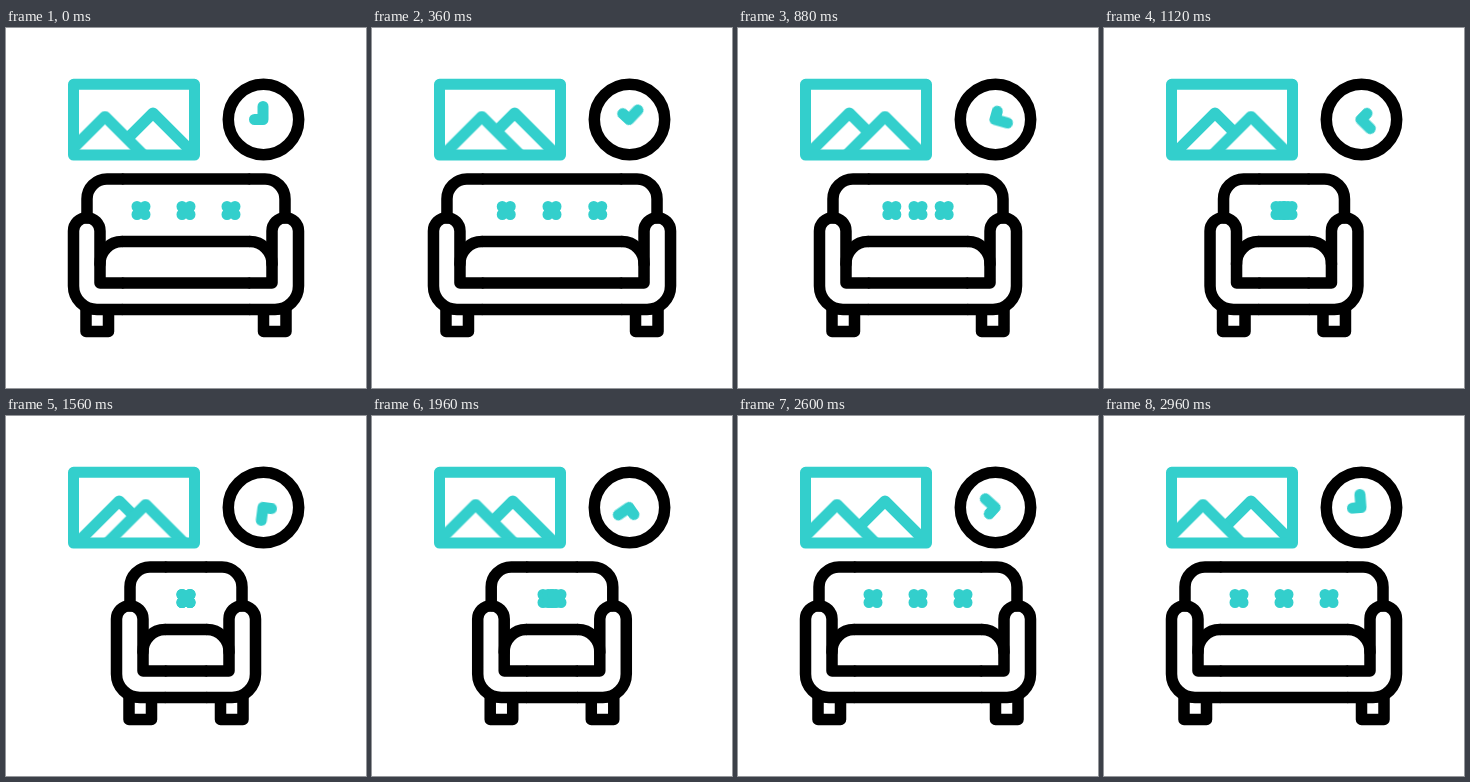
Recreate the animation shown at these times as an HTML page without scripts. Size 360 px wide and 360 px high, loop 3 s.

```html
<!DOCTYPE html>
<html lang="en">
<head>
<meta charset="utf-8">
<title>Living room</title>
<style>
  /* --half: half the sofa width, --gap: distance between buttons */
  @property --half { syntax: "<number>"; inherits: true; initial-value: 118; }
  @property --gap { syntax: "<number>"; inherits: true; initial-value: 45; }

  html, body { margin: 0; width: 100%; height: 100%; overflow: hidden; background: #fff; }
  svg { display: block; width: 100vw; height: 100vh; }
  path, rect, circle { fill: none; stroke-linecap: round; stroke-linejoin: round; }
  .teal { stroke: #33cfcc; stroke-width: 11; }
  .ink { stroke: #000; stroke-width: 11.5; }

  .sofa { animation: resize 3s infinite; }
  .side { transform: translateX(calc(var(--half) * -1px)); }
  .side path { stroke-linecap: butt; }
  .span { transform: scaleX(calc(var(--half) - 53.8)); }
  .span rect { fill: #000; stroke: none; }
  .left { transform: translateX(calc(var(--gap) * -1px)); }
  .right { transform: translateX(calc(var(--gap) * 1px)); }

  .hands { transform-origin: 257px 91.5px; animation: turn 3s linear infinite; }
  .peak { fill: #fff; }
  .front { animation: front 3s infinite; }
  .back { animation: back 3s infinite; }

  @keyframes resize {
    0% { --half: 118; --gap: 45; animation-timing-function: ease-in-out; }
    18.33% { --half: 126; --gap: 46; animation-timing-function: ease-in-out; }
    42.33% { --half: 75; --gap: 0; }
    60.33% { --half: 75; --gap: 0; animation-timing-function: ease-in-out; }
    82%, 100% { --half: 118; --gap: 45; }
  }
  @keyframes turn { to { transform: rotate(360deg); } }
  @keyframes front {
    0%, 3.5% { transform: translate(99px, 88.5px); animation-timing-function: ease-in-out; }
    29.5%, 45% { transform: translate(147px, 88.5px); animation-timing-function: ease-in-out; }
    71%, 100% { transform: translate(99px, 88.5px); }
  }
  @keyframes back {
    0%, 6% { transform: translate(147px, 85px); animation-timing-function: ease-in-out; }
    31%, 47.8% { transform: translate(111px, 85px); animation-timing-function: ease-in-out; }
    72.5%, 100% { transform: translate(147px, 85px); }
  }
</style>
</head>
<body>
<svg viewBox="0 0 360 360">
  <defs>
    <clipPath id="view"><rect x="67" y="56" width="122" height="71"/></clipPath>
    <g id="side">
      <path d="M19 190V171A20 20 0 0 1 39 151H54"/>
      <path d="M54 255H32V203A13.25 13.25 0 0 0 5.5 203V258A23.5 23.5 0 0 0 29 281.5H54"/>
      <path d="M32 236A22 22 0 0 1 54 213.5"/>
      <path d="M18 282V303.5H40.5V282"/>
    </g>
    <path id="button" d="M-4 -4L4 4M4 -4L-4 4"/>
  </defs>

  <g class="teal">
    <g clip-path="url(#view)">
      <path class="peak back" d="M-60 60L0 0L60 60"/>
      <path class="peak front" d="M-60 60L0 0L60 60"/>
    </g>
    <rect x="67.5" y="56.3" width="121" height="70.8"/>
    <path class="hands" d="M257 78.5V91.5H248.5"/>
  </g>
  <circle class="ink" cx="257.5" cy="91.5" r="35.2"/>

  <g class="sofa" transform="translate(180 0)">
    <g class="ink">
      <g class="side"><use href="#side"/></g>
      <g transform="scale(-1 1)"><g class="side"><use href="#side"/></g></g>
      <g class="span">
        <rect x="-1" y="145.25" width="2" height="11.5"/>
        <rect x="-1" y="207.75" width="2" height="11.5"/>
        <rect x="-1" y="249.25" width="2" height="11.5"/>
        <rect x="-1" y="275.75" width="2" height="11.5"/>
      </g>
    </g>
    <g class="teal" transform="translate(0 182.5)">
      <use class="left" href="#button"/>
      <use href="#button"/>
      <use class="right" href="#button"/>
    </g>
  </g>
</svg>
</body>
</html>
```
